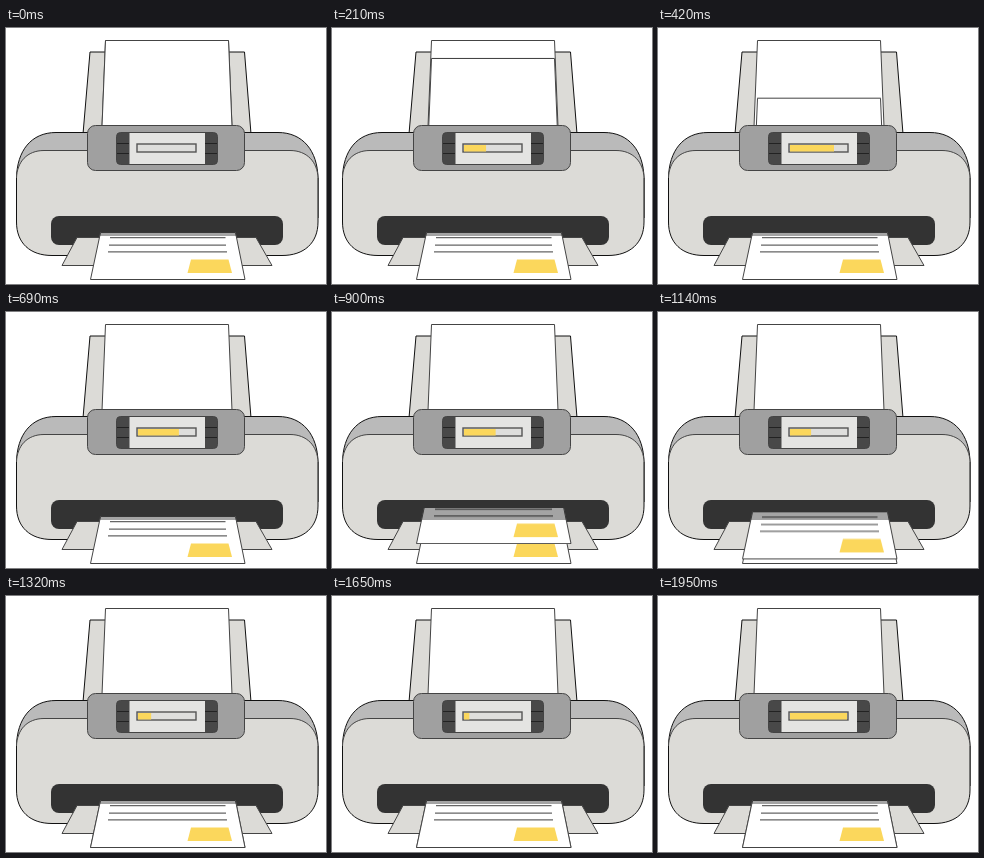
These frames come from a looping animation (320 px wide and 256 px high, 3.03 s). An HTML page without scripts:

```html
<!DOCTYPE html>
<html lang="en">
<head>
<meta charset="utf-8">
<title>Printer</title>
<style>
  html, body { margin: 0; width: 100%; height: 100%; overflow: hidden; background: #fff; }
  svg { display: block; width: 100%; height: 100%; }

  .line { stroke: #444; stroke-width: 1; stroke-linejoin: round; }
  .edge { stroke: #111; }
  .light { fill: #dcdbd7; }
  .mid { fill: #a0a0a0; }
  .pale { fill: #bababa; }
  .dark { fill: #333; }
  .paper { fill: #fff; }
  .accent { fill: #fbd75c; }
  .text { fill: none; stroke: #666; stroke-width: 1.2; }

  .feed, .eject, .progress { animation: 3030ms linear infinite; }
  .feed { animation-name: feed; }
  .eject { animation-name: eject; }
  .progress { animation-name: progress; transform-origin: 132px 0; }

  /* The front sheet is pulled down into the printer */
  @keyframes feed {
    0% { transform: translateY(0); animation-timing-function: ease-in; }
    17.82%, 100% { transform: translateY(87px); }
  }
  /* The printed sheet slides out and slows down */
  @keyframes eject {
    0%, 22.77% { transform: translateY(-57px); animation-timing-function: cubic-bezier(.3, .45, .7, .87); }
    29.7% { transform: translateY(-20px); }
    33.66% { transform: translateY(-12px); animation-timing-function: cubic-bezier(.3, .4, .7, .9); }
    41.58%, 100% { transform: translateY(0); }
  }
  @keyframes progress {
    0% { transform: scaleX(0); }
    15.84% { transform: scaleX(.88); }
    53.47% { transform: scaleX(0); }
    64.36%, 100% { transform: scaleX(1); }
  }
</style>
</head>
<body>
<svg viewBox="0 0 320 256">
  <defs>
    <path id="blank" class="paper line" d="M99.5 12.5H222.5L226 98.5V110H96V98.5Z"/>
    <path id="outline" d="M94.5 204.5H229.5L239 251.5H84.5Z"/>
    <g id="print">
      <use href="#outline" class="paper line"/>
      <path class="text" d="M104 209.7H219.5M103 217.2H220M102 223.8H221"/>
      <path class="accent" d="M185 231.5H222.5L226 245H181.5Z"/>
    </g>
    <path id="buttons" d="M111 115.5H123M111 125.5H123" stroke="#222"/>
    <clipPath id="outlet"><rect x="60" y="196" width="200" height="60"/></clipPath>
    <clipPath id="slot"><rect x="60" y="196" width="200" height="12"/></clipPath>
  </defs>

  <!-- Paper tray -->
  <path class="light line edge" d="M84 24H238.5L245 106H77Z"/>
  <use href="#blank"/>
  <use href="#blank" class="feed"/>

  <!-- Body -->
  <path class="pale line edge" d="M10.5 150C11 123 25 104.5 50 104.5H272C297 104.5 311.5 123 312 150V190H10.5Z"/>
  <path class="light line edge" d="M10.5 150V194C10.5 215 24 227.5 46 227.5H276C298 227.5 312 215 312 194V150"/>
  <path class="light line" d="M10.5 150C11 134 21 122.5 38 122.5H284C301 122.5 311.5 134 312 150"/>

  <!-- Control panel -->
  <rect class="mid line" x="81.5" y="97.5" width="157" height="45" rx="8"/>
  <rect class="line" x="110.5" y="104.5" width="101" height="32" rx="4" fill="#484848"/>
  <use href="#buttons"/>
  <use href="#buttons" x="88"/>
  <rect x="123.5" y="105" width="75.5" height="31" fill="#e4e4e2"/>
  <rect x="131" y="116" width="59" height="8" fill="#dededc" stroke="#555" stroke-width="1.4"/>
  <rect class="accent progress" x="132" y="117" width="57" height="6.5"/>

  <!-- Output -->
  <rect class="dark" x="45" y="188" width="232" height="29" rx="8"/>
  <path class="light line" d="M71 209.5H250L266 237.5H56Z"/>
  <use href="#print"/>
  <g clip-path="url(#outlet)"><use href="#print" class="eject"/></g>

  <!-- Shadow of the slot on the sheets -->
  <g clip-path="url(#slot)">
    <g opacity=".36">
      <use href="#outline"/>
      <use href="#outline" class="eject"/>
    </g>
  </g>
</svg>
</body>
</html>
```
